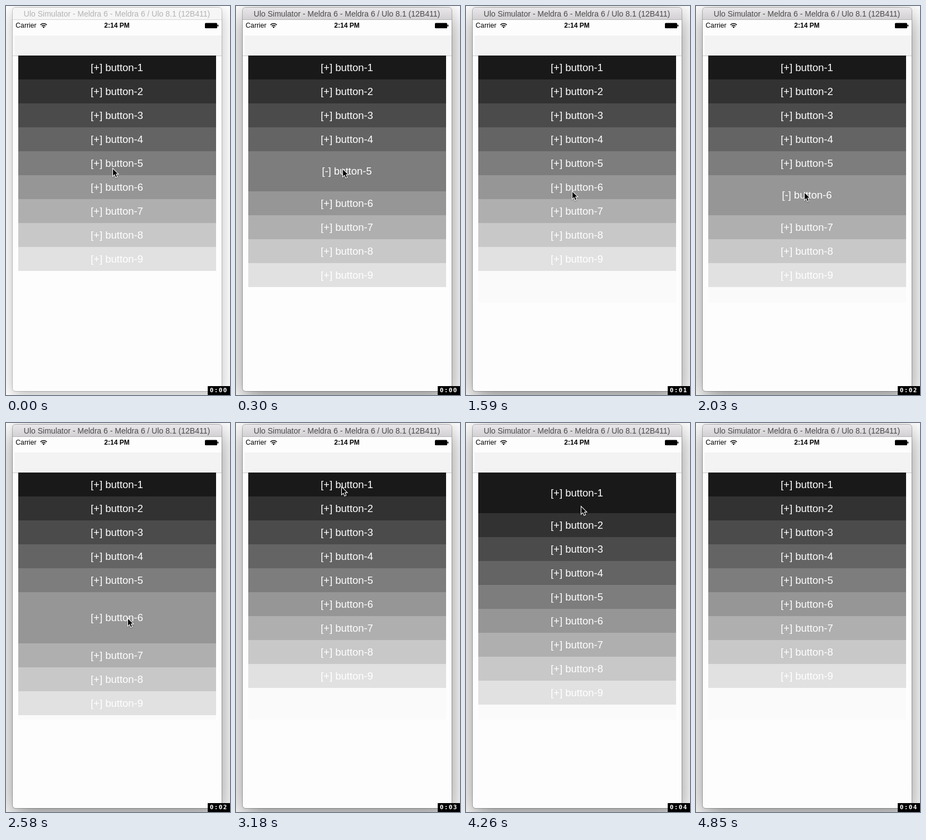
Write an HTML page with a canvas that moves like this. It is 402 px wide and 699 px high and loops after 5000 ms.

```html
<!DOCTYPE html>
<html lang="en">
<head>
<meta charset="utf-8">
<title>Expanding buttons</title>
<style>
  html, body { margin: 0; width: 100%; height: 100%; overflow: hidden; background: #fff; }
  canvas { display: block; }
</style>
</head>
<body>
<canvas id="stage" width="402" height="699"></canvas>
<script>
const ctx = document.getElementById('stage').getContext('2d');
const SANS = '"Liberation Sans", Arial, sans-serif';
const MONO = '"DejaVu Sans Mono", monospace';
const LOOP = 5000;
const SECOND = 990, TICK = 150;
const ACTIVATE = 150, CURSOR_EXIT = 4850;
const ROW = 43, GROWTH = 57, TOGGLE_MS = 300, LIST_TOP = 89;

const TOGGLES = [
  { row: 5, open: ACTIVATE, close: 930 },
  { row: 6, open: 1830, close: 2509 },
  { row: 1, open: 3336, close: 4115 },
];

// Resting points of the pointer: time, x, y.
const CURSOR_PATH = [
  [0, 191, 291], [1140, 191, 296], [1590, 190, 332], [1890, 190, 332],
  [2580, 218, 350], [3000, 189, 114], [3570, 187, 114], [4020, 190, 118],
  [4260, 206, 149], [4710, 260, 239],
];

const clamp = v => Math.min(1, Math.max(0, v));
const mix = (a, b, p) => a + (b - a) * p;
const gray = v => `rgb(${v},${v},${v})`;

function ease(v) {
  const p = clamp(v);
  return p * p * (3 - 2 * p);
}

function rect(x, y, w, h, color) {
  ctx.fillStyle = color;
  ctx.fillRect(x, y, w, h);
}

function rounded(x, y, w, h, r) {
  ctx.beginPath();
  ctx.roundRect(x, y, w, h, r);
}

function text(str, x, y, font, color, align = 'center') {
  ctx.font = font;
  ctx.fillStyle = color;
  ctx.textAlign = align;
  ctx.fillText(str, x, y);
}

function drawWindow(active) {
  rect(0, 0, 402, 699, '#fff');
  ctx.save();
  ctx.shadowColor = `rgba(0,0,0,${active ? 0.47 : 0.28})`;
  ctx.shadowBlur = active ? 42 : 28;
  ctx.shadowOffsetY = active ? 13 : 7;
  ctx.fillStyle = '#fdfdfd';
  rounded(12, 3, 375, 689, 5);
  ctx.fill();
  ctx.restore();

  ctx.save();
  rounded(12, 3, 375, 689, 5);
  ctx.clip();
  const bar = ctx.createLinearGradient(0, 3, 0, 25);
  bar.addColorStop(0, active ? '#e9e7e9' : '#f6f6f6');
  bar.addColorStop(1, active ? '#d2d0d2' : '#f6f6f6');
  rect(12, 3, 375, 22, bar);
  rect(12, 24, 375, 1, active ? '#b4b2b4' : '#d6d6d6');
  rect(12, 53, 375, 36, '#f9f9f9');
  rect(16, 53, 371, 36, '#f3f3f3');
  ctx.fillStyle = '#f1f1f1';
  rounded(30, 82, 338, 7, [5, 5, 0, 0]);
  ctx.fill();
  rect(12, 89, 375, 1, '#cccccc');
  ctx.restore();

  ctx.strokeStyle = `rgba(0,0,0,${active ? 0.26 : 0.18})`;
  ctx.lineWidth = 1;
  rounded(11.5, 2.5, 376, 690, 5.5);
  ctx.stroke();
  text('Ulo Simulator - Meldra 6 - Meldra 6 / Ulo 8.1 (12B411)', 199, 19,
    `14px ${SANS}`, active ? '#4b4a4b' : '#b3b3b3');
}

function drawStatusBar() {
  text('Carrier', 17.3, 39, `12.2px ${SANS}`, '#000', 'left');
  text('2:14 PM', 199, 39, `bold 12px ${SANS}`, '#000');

  const wifiArc = r => ctx.arc(67.5, 39.5, r, -Math.PI * 0.75, -Math.PI * 0.25);
  ctx.strokeStyle = ctx.fillStyle = '#000';
  ctx.lineWidth = 1.7;
  for (const r of [4.7, 8]) {
    ctx.beginPath();
    wifiArc(r);
    ctx.stroke();
  }
  ctx.beginPath();
  ctx.moveTo(67.5, 39.7);
  wifiArc(2.6);
  ctx.fill();

  rounded(357, 30.5, 22, 9.5, 1.5);
  ctx.fill();
  rounded(379.5, 33.5, 1.7, 3.5, 0.7);
  ctx.fill();
}

function drawButtons(t) {
  let y = LIST_TOP;
  for (let i = 1; i <= 9; i++) {
    const toggle = TOGGLES.find(({ row }) => row === i);
    let height = ROW, sign = '+';
    if (toggle) {
      const { open, close } = toggle;
      const growth = ease((t - open) / TOGGLE_MS) - ease((t - close) / TOGGLE_MS);
      height += Math.round(GROWTH * growth);
      if (t >= open && t < close) sign = '-';
    }
    rect(22, y, 355, height, gray(25 * i));
    text(`[${sign}] button-${i}`, 199, Math.round(y + height / 2 + 6), `18.5px ${SANS}`, '#fff');
    y += height;
  }
}

function drawCursor(t) {
  const next = CURSOR_PATH.findIndex(([time]) => time > t);
  const end = next < 0 ? CURSOR_PATH.length - 1 : next;
  const [t0, x0, y0] = CURSOR_PATH[end - 1];
  const [t1, x1, y1] = CURSOR_PATH[end];
  const p = clamp((t - t0) / (t1 - t0));

  ctx.save();
  ctx.translate(Math.round(mix(x0, x1, p)), Math.round(mix(y0, y1, p)));
  const arrow = new Path2D('M1 2V14L3.9 11.3L6.2 16.6L8 15.8L5.8 10.6H9.6Z');
  ctx.strokeStyle = '#fff';
  ctx.lineWidth = 2.2;
  ctx.shadowColor = 'rgba(0,0,0,.35)';
  ctx.shadowBlur = 2;
  ctx.shadowOffsetY = 1;
  ctx.stroke(arrow);
  ctx.shadowColor = 'transparent';
  ctx.fillStyle = '#000';
  ctx.fill(arrow);
  ctx.restore();
}

function drawClock(seconds) {
  rect(362, 683, 40, 16, '#000');
  [...`0:0${seconds}`].forEach((ch, i) =>
    text(ch, 369 + 8 * i, 694, `bold 11px ${MONO}`, '#fff'));
}

function render(time) {
  const seconds = Math.min(4, Math.floor(time / SECOND));
  const t = seconds * SECOND + Math.floor((time - seconds * SECOND) / TICK) * TICK;
  drawWindow(t >= ACTIVATE);
  drawStatusBar();
  if (t >= ACTIVATE + TOGGLE_MS) rect(22, LIST_TOP + 9 * ROW, 355, GROWTH, '#fafafa');
  drawButtons(t);
  if (time < CURSOR_EXIT) drawCursor(t);
  drawClock(seconds);
}

const start = performance.now();
function loop() {
  render((performance.now() - start) % LOOP);
  requestAnimationFrame(loop);
}
loop();
</script>
</body>
</html>
```
